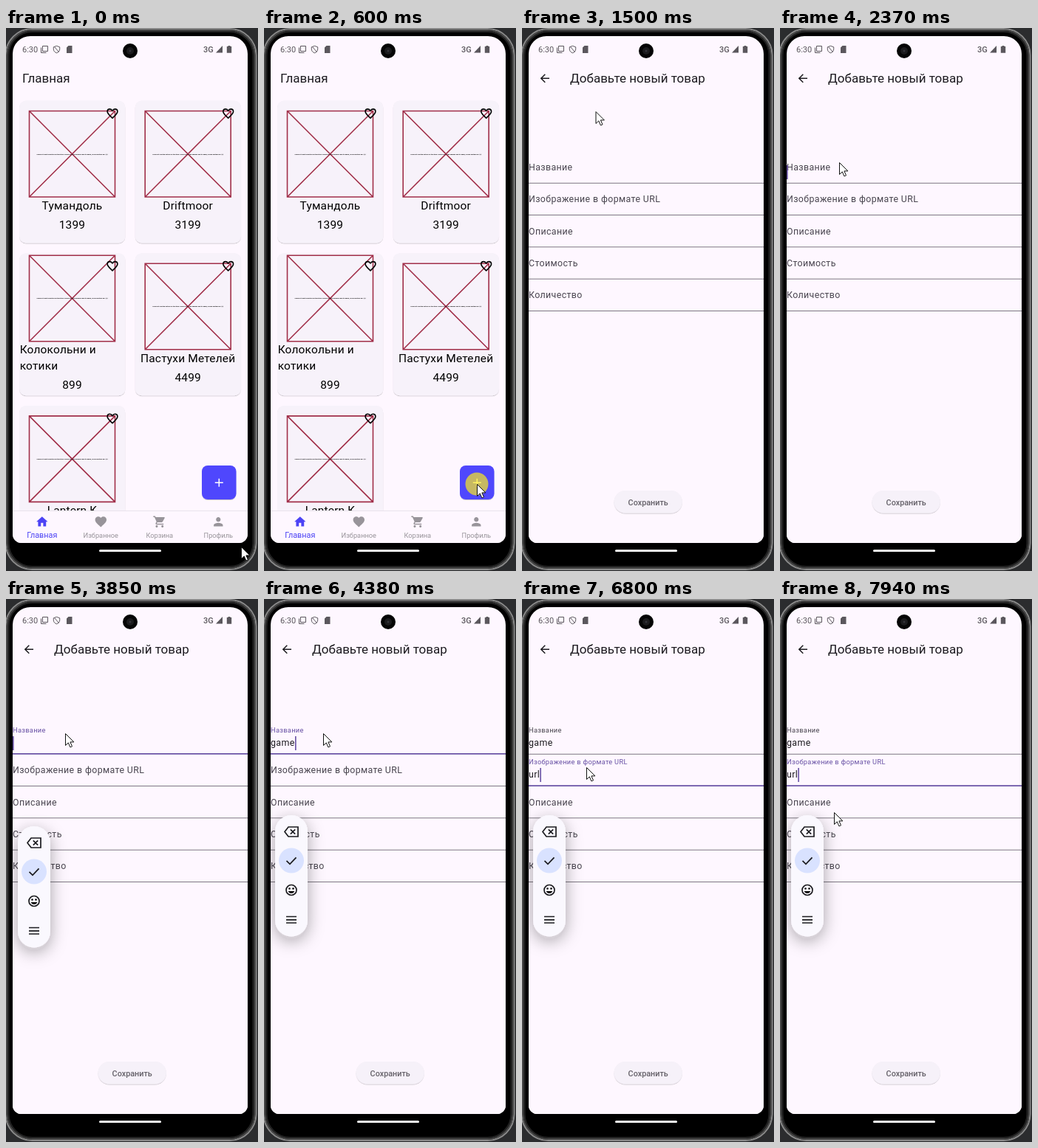
An HTML page for the animation above (8000 ms loop, 341x736 px).

```html
<!DOCTYPE html>
<html lang="ru">
<head>
<meta charset="utf-8">
<title>Каталог</title>
<style>
html, body { margin: 0; width: 100%; height: 100%; overflow: hidden; background: #2b2c2e; }
svg { display: block; width: 100%; height: 100%; font-family: Roboto, sans-serif; }
.title { font-size: 17px; fill: #1d1b20; }
.name { font-size: 15.46px; letter-spacing: .19px; fill: #000; }
.mid { text-anchor: middle; }
.tiny { font-size: 2.1px; fill: #000; font-weight: 700; }
.field { font-size: 12.37px; letter-spacing: .39px; fill: #49454f; }
.value { fill: #1d1b20; }
.tab { font-size: 9.28px; fill: #98949a; }
.tab.on { font-size: 10.82px; fill: #4c43f5; }
.line { fill: none; stroke: #1b1b1f; stroke-width: 1.7; }
</style>
</head>
<body>
<svg viewBox="0 0 341 736" xmlns="http://www.w3.org/2000/svg">
  <defs>
    <clipPath id="screen"><path d="M9 35a24 24 0 0 1 24-24H303a24 24 0 0 1 24 24V686a12 12 0 0 1-12 12H21a12 12 0 0 1-12-12Z"/></clipPath>
    <clipPath id="list"><rect x="9" y="80" width="318" height="575"/></clipPath>
    <filter id="soft" x="-30%" y="-30%" width="160%" height="160%">
      <feDropShadow dx="0" dy=".8" stdDeviation=".7" flood-opacity=".26"/>
    </filter>
    <filter id="lift" x="-150%" y="-40%" width="400%" height="180%">
      <feDropShadow dx="0" dy="6" stdDeviation="11" flood-color="#1c1824" flood-opacity=".34"/>
    </filter>
    <path id="heart" d="M12 21.35l-1.45-1.32C5.4 15.36 2 12.28 2 8.5 2 5.42 4.42 3 7.5 3c1.74 0 3.41.81 4.5 2.09C13.09 3.81 14.76 3 16.5 3 19.58 3 22 5.42 22 8.5c0 3.78-3.4 6.86-8.55 11.54z"/>
    <path id="heartLine" d="M12 20l-.6-.55C6.3 14.8 3.1 11.9 3.1 8.5 3.1 6 5 4.1 7.5 4.1c1.75 0 3.5 1.1 4.05 2.7h.9C13 5.2 14.75 4.1 16.5 4.1 19 4.1 20.9 6 20.9 8.5c0 3.4-3.2 6.3-8.3 10.95z" fill="none" stroke="#000" stroke-width="2.1"/>
    <path id="home" d="M10 20v-6h4v6h5v-8h3L12 3 2 12h3v8z"/>
    <path id="cart" d="M7 18c-1.1 0-1.99.9-1.99 2S5.9 22 7 22s2-.9 2-2-.9-2-2-2zM1 2v2h2l3.6 7.59-1.35 2.45C4.52 15.37 5.48 17 7 17h12v-2H7.42c-.14 0-.25-.11-.25-.25l.03-.12.9-1.63h7.45c.75 0 1.41-.41 1.75-1.03l3.58-6.49C21.25 4.82 20.76 4 20 4H5.21l-.94-2H1zm16 16c-1.1 0-1.99.9-1.99 2s.89 2 1.99 2 2-.9 2-2-.9-2-2-2z"/>
    <path id="person" d="M12 12c2.21 0 4-1.79 4-4s-1.79-4-4-4-4 1.79-4 4 1.79 4 4 4zm0 2c-2.67 0-8 1.34-8 4v2h16v-2c0-2.66-5.33-4-8-4z"/>
  </defs>

  <rect width="341" height="736" fill="#2b2c2e"/>
  <rect x="-.5" y="1" width="339" height="733" rx="36" fill="#000" stroke="#8a8a8a" stroke-width="2"/>
  <rect x="1.5" y="3" width="335" height="729" rx="34" fill="none" stroke="#484848" stroke-width="2"/>
  <rect x="3.5" y="5" width="331" height="725" rx="32" fill="none" stroke="#222" stroke-width="2"/>

  <g clip-path="url(#screen)">
    <rect x="9" y="11" width="318" height="688" fill="#fef7ff"/>
    <g>
      <text class="title" x="22" y="74">Главная</text>
      <g id="cards" clip-path="url(#list)"></g>
      <rect x="265" y="593" width="46.5" height="46" rx="8" fill="#5046fd" filter="url(#soft)"/>
      <path d="M288.3 610.8v11M282.8 616.3h11" stroke="#fff" stroke-width="1.5"/>
      <rect x="9" y="655" width="318" height="44" fill="#fef7ff"/>
      <path d="M9 654.5h318" stroke="#e9e3ec"/>
      <g id="tabs"></g>
    </g>
    <g id="formPage">
      <rect x="9" y="45" width="318" height="654" fill="#fef7ff"/>
      <path d="M37 68.3H26M31.3 62.8l-5.5 5.5 5.5 5.5" fill="none" stroke="#1d1b20" stroke-width="1.5"/>
      <text class="title" x="65" y="74">Добавьте новый товар</text>
      <g id="fields"></g>
      <rect id="caret" width="1.6" height="19" fill="#6750a4"/>
      <rect x="124.5" y="627" width="92.5" height="30.5" rx="15.25" fill="#f6f1f9" filter="url(#soft)"/>
      <text class="mid" x="170.7" y="646.5" font-size="10.82" font-weight="500" fill="#646068">Сохранить</text>
      <g id="panel">
        <rect x="15" y="293" width="44" height="164.5" rx="22" fill="#faf8fe" filter="url(#lift)"/>
        <circle cx="37" cy="354.5" r="17" fill="#d9e2ff"/>
        <path class="line" d="M33 309h13v13H33l-5-6.5zM35.8 312.3l6.4 6.4M42.2 312.3l-6.4 6.4"/>
        <path class="line" d="M30.5 354.8l4.5 4.5 8.5-9"/>
        <circle class="line" cx="37" cy="394.5" r="7"/>
        <circle cx="34.5" cy="392.5" r="1.3"/><circle cx="39.5" cy="392.5" r="1.3"/>
        <path d="M32.7 396h8.6a4.5 4 0 0 1-8.6 0z"/>
        <path class="line" d="M30 430.5h14M30 434.8h14M30 439h14"/>
      </g>
    </g>

    <g fill="#5b575d" font-size="11">
      <text x="22" y="33">6:30</text>
      <path d="M49.5 24.5h7v7h-7zM47.5 26.5v7h7M68.5 24.3l4.2 1.5v3c0 2.5-2 4.3-4.2 5-2.2-.7-4.2-2.5-4.2-5v-3zM65.5 25.5l6 7" fill="none" stroke="#5b575d"/>
      <path d="M84.5 24h5v10h-7.5v-7.5zM293 24v9.5h-9z"/>
      <text x="267" y="32.5" font-weight="500">3G</text>
      <path d="M300.5 24h3v1h1.7v8.8h-6.4V25h1.7z"/>
    </g>
  </g>
  <circle cx="168" cy="31" r="10" fill="#050505"/>
  <circle cx="168" cy="31" r="5" fill="#1b1b1d"/>
  <circle cx="168" cy="31" r="1.5" fill="#34343a"/>
  <rect x="126" y="707" width="84" height="3" rx="1.5" fill="#f4f4f4"/>

  <circle id="click" r="15.5" fill="#ffee18" fill-opacity=".68"/>
  <path id="pointer" d="M.5 .5v16l3.8-3.6 2.6 6 2.6-1.1-2.6-5.9h5z" fill="#fff" stroke="#111"/>
</svg>
<script>
const LOOP = 8000, TICK = 67.2;
const $ = id => document.getElementById(id);
const icon = (id, cx, cy, fill) =>
  `<use href="#${id}" fill="${fill}" transform="translate(${cx - 9.27} ${cy - 9.27}) scale(.773)"/>`;

const note = 'Could not load the picture for this item. Please check the address and try again, or pick another file. (0)';

function card(col, row, lines, price) {
  const x = 18 + col * 156.7, y = 98.5 + row * 206.7, cx = x + 71.5;
  const tall = lines.length > 1;
  const top = y + (tall ? 3 : 14);
  const base = top + 133.5;
  const names = lines.map((s, i) => tall
    ? `<text class="name" x="${x + .7}" y="${base - .5 + i * 22}">${s}</text>`
    : `<text class="name mid" x="${cx}" y="${base}">${s}</text>`).join('');
  return `<rect x="${x}" y="${y}" width="143.4" height="193" rx="9" fill="#f7f2fa" filter="url(#soft)"/>
    <path d="M${cx - 58} ${top}h116v116.5h-116zl116 116.5m0-116.5l-116 116.5" fill="none" stroke="#a12f49" stroke-width="1.6"/>
    <text class="tiny mid" x="${cx}" y="${top + 59}">${note}</text>
    ${icon('heartLine', x + 126, y + 17.5, 'none')}${names}
    <text class="name mid" x="${cx}" y="${base + 26 + (tall ? 21.5 : 0)}">${price}</text>`;
}

$('cards').innerHTML = [
  [0, 0, ['Тумандоль'], 1399],
  [1, 0, ['Driftmoor'], 3199],
  [0, 1, ['Колокольни и', 'котики'], 899],
  [1, 1, ['Пастухи Метелей'], 4499],
  [0, 2, ['Lantern K'], 1999]
].map(c => card(...c)).join('');

$('tabs').innerHTML = [['home', 'Главная'], ['heart', 'Избранное'], ['cart', 'Корзина'], ['person', 'Профиль']]
  .map(([id, label], i) => {
    const x = 48.8 + i * 79.5;
    return icon(id, x, 669.3, i ? '#98949a' : '#4c43f5') +
      `<text class="tab mid ${i ? '' : 'on'}" x="${x}" y="690.5">${label}</text>`;
  }).join('');

const fields = ['Название', 'Изображение в формате URL', 'Описание', 'Стоимость', 'Количество'];
const ruleY = i => 210.3 + i * 43.3;
$('fields').innerHTML = fields.map((label, i) =>
  `<rect id="rule${i}" x="9" width="318"/>
   <text id="label${i}" class="field">${label}</text>
   <text id="value${i}" class="field value" x="9" y="${ruleY(i) - 11.3}"></text>`).join('');

// Pointer path: tick, x, y
const path = [
  [0, 318, 703], [5, 288, 618], [9, 288, 618], [12, 232, 472], [17, 120, 114], [19, 103, 90],
  [21, 103, 90], [25, 89, 182], [31, 89, 182], [32, 80, 182], [75, 80, 182], [78, 87, 229],
  [86, 87, 228], [107, 87, 228], [118, 73, 289]
];
const clicks = [[6, 9], [29, 32], [81, 84]];
const carets = [[2370, 2770], [3380, 3910], [4380, 4780], [5110, 6130], [6270, 7270], [7800, LOOP]];
const FOCUS_1 = 2425, FOCUS_2 = 5650;

const within = (list, v) => list.some(([a, b]) => v >= a && v < b);
const ease = u => { u = Math.min(1, Math.max(0, u)); return u * u * (3 - 2 * u); };
const show = (id, on) => $(id).setAttribute('visibility', on ? 'visible' : 'hidden');

function locate(k) {
  let i = 0;
  while (i < path.length - 2 && path[i + 1][0] <= k) i++;
  const [k0, x0, y0] = path[i], [k1, x1, y1] = path[i + 1];
  const u = Math.min(1, (k - k0) / (k1 - k0));
  return [x0 + (x1 - x0) * u, y0 + (y1 - y0) * u];
}

function drawField(i, float, focused) {
  const y = ruleY(i), label = $('label' + i), rule = $('rule' + i);
  label.setAttribute('transform', `translate(9 ${y - 17.3 - 12 * float}) scale(${1 - .25 * float})`);
  label.style.fill = focused && float > 0 ? '#6750a4' : '#49454f';
  rule.setAttribute('y', focused ? y - 1.3 : y - .5);
  rule.setAttribute('height', focused ? 1.7 : .9);
  rule.setAttribute('fill', focused ? '#6750a4' : '#6f6a74');
}

function render(t) {
  const k = Math.max(0, Math.floor((t - 6) / TICK));
  const spot = `translate(${locate(k)})`;
  $('pointer').setAttribute('transform', spot);
  $('click').setAttribute('transform', spot);
  show('click', within(clicks, k));

  $('formPage').setAttribute('opacity', t < 1220 ? 0 : t < 1290 ? .5 : 1);

  const second = t >= FOCUS_2;
  fields.forEach((_, i) => {
    const float = i === 0 ? +(t >= FOCUS_1) : i === 1 ? ease((t - FOCUS_2) / 140) : 0;
    drawField(i, float, i === 0 ? t >= FOCUS_1 && !second : i === 1 && second);
  });

  const typed = [6270, 6470, 6800].filter(s => t >= s).length;
  $('value0').textContent = t >= 4380 ? 'game' : '';
  $('value1').textContent = 'url'.slice(0, typed);
  $('caret').setAttribute('x', second ? [9, 16.5, 21.5, 24.3][typed] : t >= 4380 ? 42 : 9);
  $('caret').setAttribute('y', second ? 229 : 186);
  show('caret', within(carets, t));

  const drop = 1 - ease((t - 3900) / 210);
  $('panel').setAttribute('transform', `translate(${drop} ${15 * drop})`);
  show('panel', t >= 3850);
}

const start = performance.now();
function loop() {
  render((performance.now() - start) % LOOP);
  requestAnimationFrame(loop);
}
render(0);
requestAnimationFrame(loop);
</script>
</body>
</html>
```
